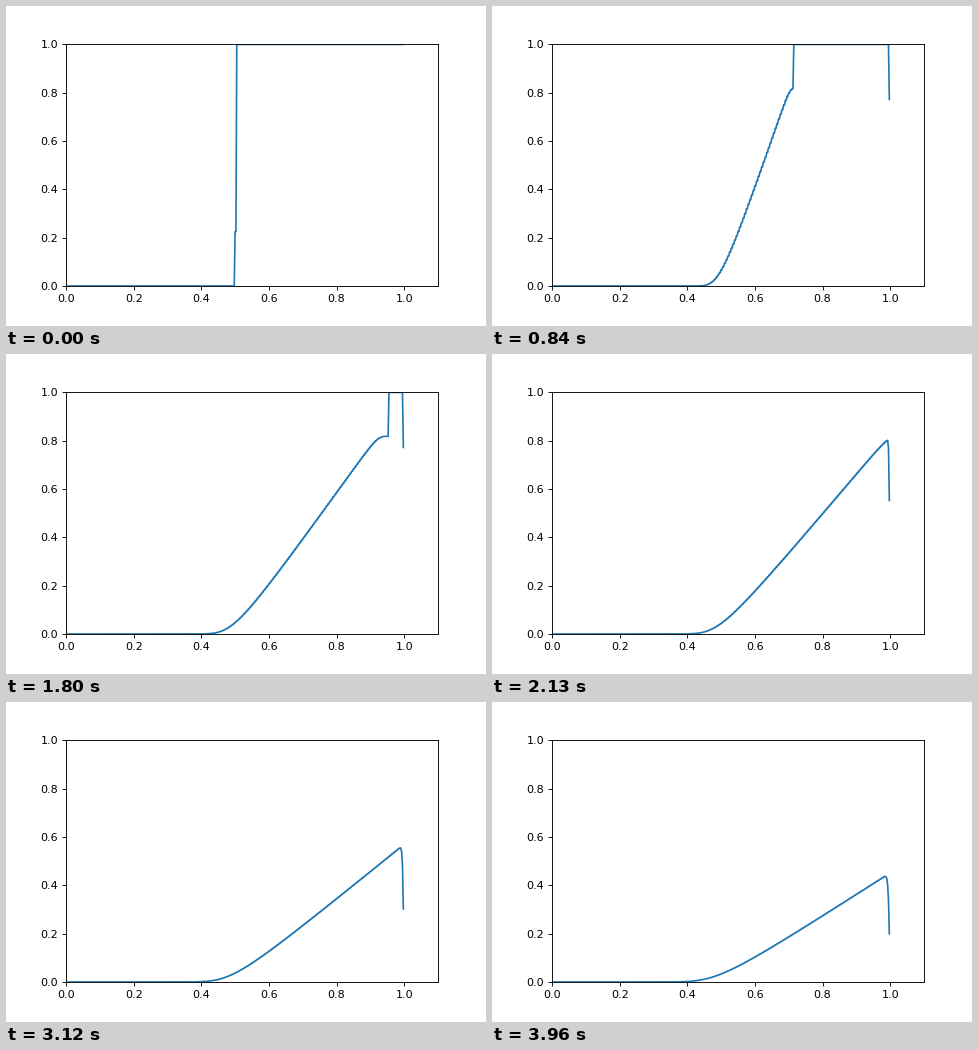
These frames come from a looping animation (480 px wide and 320 px high, 3.99 s). A matplotlib script:

```python
import numpy as np
import matplotlib.pyplot as plt
from matplotlib.animation import FuncAnimation

# Burgers' equation, Lax-Friedrichs scheme, step initial data
CELLS = 400
RATIO = 1.1          # dt / dx
FRAMES = 133
STEPS_PER_FRAME = 3


def flux(u):
    return u * u / 2


def advance(u):
    """One Lax-Friedrichs step; both end nodes are held at zero."""
    left, right = u[:-2], u[2:]
    new = np.zeros_like(u)
    new[1:-1] = (left + right) / 2 - RATIO / 2 * (flux(right) - flux(left))
    return new


def solve():
    nodes = np.arange(CELLS + 1)
    u = np.where(nodes > CELLS // 2, 1.0, 0.0)
    states = []
    for step in range(STEPS_PER_FRAME * FRAMES):
        u = advance(u)
        if step % STEPS_PER_FRAME == 0:
            states.append(u[:-1])
    return nodes[:-1] / CELLS, states


x, states = solve()

fig = plt.figure(figsize=(6, 4), dpi=80, facecolor="white")
fig.subplots_adjust(left=0.125, right=0.9, bottom=0.125, top=0.88)
ax = fig.add_subplot(xlim=(0, 1.1), ylim=(0, 1))
line, = ax.plot(x, states[0], color="#1f77b4", lw=1.5)


def update(i):
    line.set_data(x, states[i])
    return line,


anim = FuncAnimation(fig, update, frames=FRAMES, interval=30,
                     repeat=True, repeat_delay=0, blit=False)
plt.show()
```
